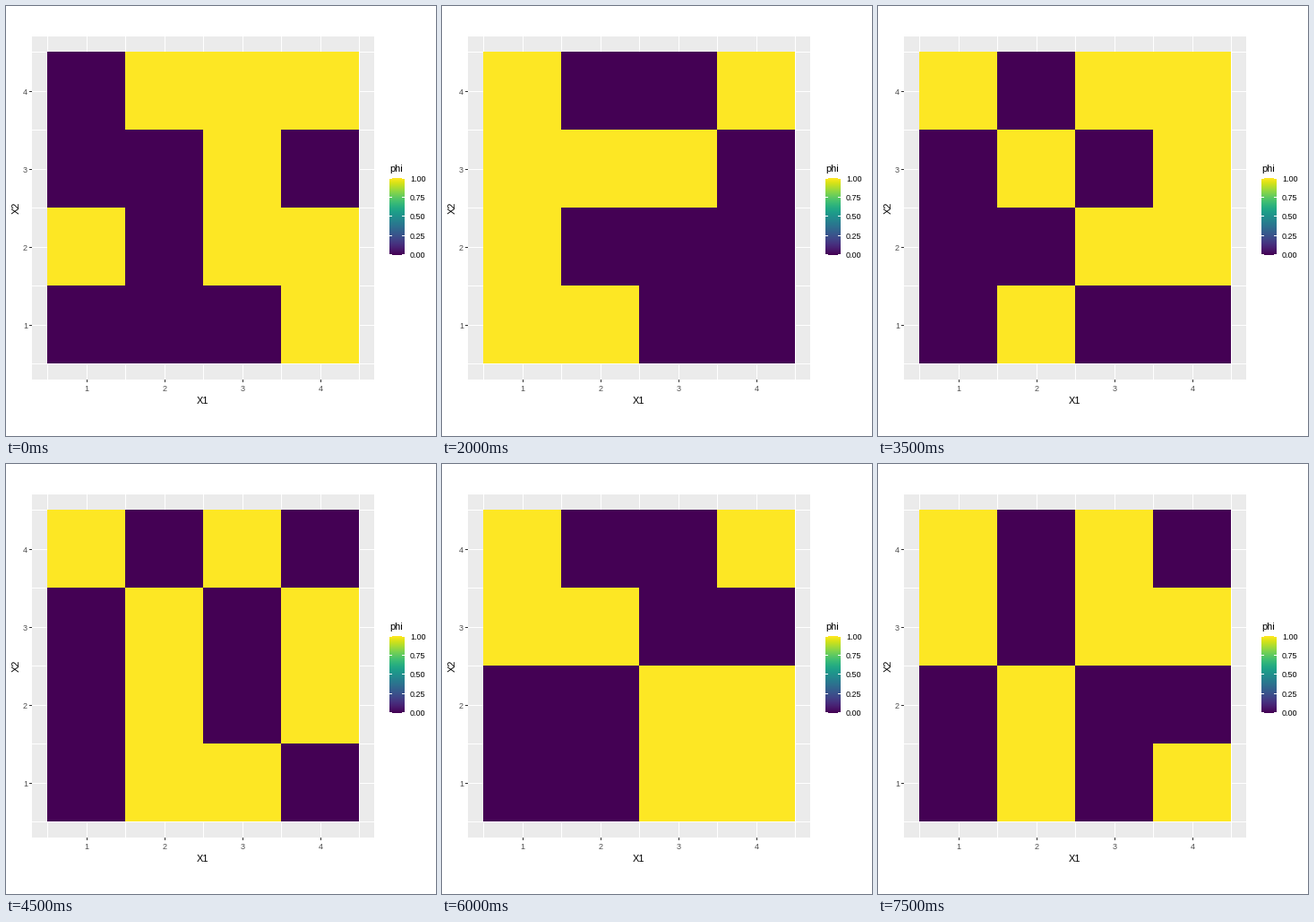
A matplotlib script that plays this animation: 480 by 480 pixels, repeating every 8 s.

```python
import numpy as np
import matplotlib.pyplot as plt
from matplotlib.animation import FuncAnimation
from matplotlib.patches import Rectangle

SIZE, DPI = 480, 72
LEFT, TOP, CELL, N = 46, 51, 87, 4
RIGHT, BOTTOM = LEFT + N * CELL, TOP + N * CELL
PANEL = (29, 34, 382, 383)
BAR = (428, 192, 17, 86)
GREY, TICK, LABEL = "#EBEBEB", "#333333", "#4D4D4D"

# Each state holds eight filled cells, rows listed from X2 = 4 down to 1.
STATES = [
    "0111 0010 1011 0001",
    "0011 1010 0011 0110",
    "0111 1010 0010 0101",
    "1011 0010 0011 1001",
    "1001 1110 1000 1100",
    "1001 1100 1010 0110",
    "1100 0011 0101 0110",
    "1011 0101 0011 0100",
    "1010 1100 0011 0110",
    "1010 0101 0101 0110",
    "0110 1001 0110 1001",
    "0011 1010 1100 0101",
    "1001 1100 0011 0011",
    "1010 1100 0110 0101",
    "0110 0101 1001 0101",
    "1010 1011 0100 0101",
]

plt.rcParams["font.family"] = "Liberation Sans"
fig = plt.figure(figsize=(SIZE / DPI, SIZE / DPI), dpi=DPI, facecolor="white")
ax = fig.add_axes([0, 0, 1, 1])
ax.axis("off")


def box(x, y, w, h, color, z):
    ax.add_patch(Rectangle((x, y), w, h, facecolor=color, linewidth=0,
                           antialiased=False, zorder=z))


def label(x, y, text, size=9, color="black", **kw):
    kw = {"ha": "center", "va": "baseline", **kw}
    ax.text(x, y, text, fontsize=size, color=color, zorder=6, **kw)


def grid(state):
    return np.array([[int(c) for c in row] for row in state.split()])


def draw_panel():
    x, y, w, h = PANEL
    box(x, y, w, h, GREY, 1)
    for i in range(N + 1):
        box(LEFT + i * CELL, y, 1, h, "white", 2)
        box(x, TOP + i * CELL, w, 1, "white", 2)
    for i in range(N):
        cx = LEFT + i * CELL + CELL // 2 + 1
        cy = TOP + i * CELL + CELL // 2 + 1
        box(cx, y, 1, h, "white", 2)
        box(x, cy, w, 1, "white", 2)
        box(cx, y + h, 1, 3, TICK, 2)
        box(x - 3, cy, 3, 1, TICK, 2)
        label(cx, 430, str(i + 1), color=LABEL)
        label(24, cy + 4, str(N - i), color=LABEL, ha="right")
    label(219.5, 444, "X1", 11)
    label(12, 225.5, "X2", 11, rotation=90, va="center")


def draw_legend():
    x, y, w, h = BAR
    ramp = np.linspace(1, 0, h)[:, None]
    ax.imshow(ramp, cmap="viridis", vmin=0, vmax=1, aspect="auto",
              interpolation="nearest", extent=(x, x + w, y + h, y), zorder=3)
    label(x, 185, "phi", 11, ha="left")
    for i in range(5):
        ty = y + round(i * (h - 1) / 4)
        box(x, ty, 3, 1, "white", 4)
        box(x + w - 3, ty, 3, 1, "white", 4)
        label(451, ty + 4, f"{1 - i / 4:.2f}", ha="left")


draw_panel()
draw_legend()
tiles = ax.imshow(grid(STATES[0]), cmap="viridis", vmin=0, vmax=1,
                  aspect="auto", interpolation="nearest",
                  extent=(LEFT, RIGHT, BOTTOM, TOP), zorder=3)
ax.set_xlim(0, SIZE)
ax.set_ylim(SIZE, 0)


def update(i):
    tiles.set_data(grid(STATES[i % len(STATES)]))
    return [tiles]


anim = FuncAnimation(fig, update, frames=len(STATES), interval=500,
                     repeat=True, repeat_delay=0, blit=False)
plt.show()
```
